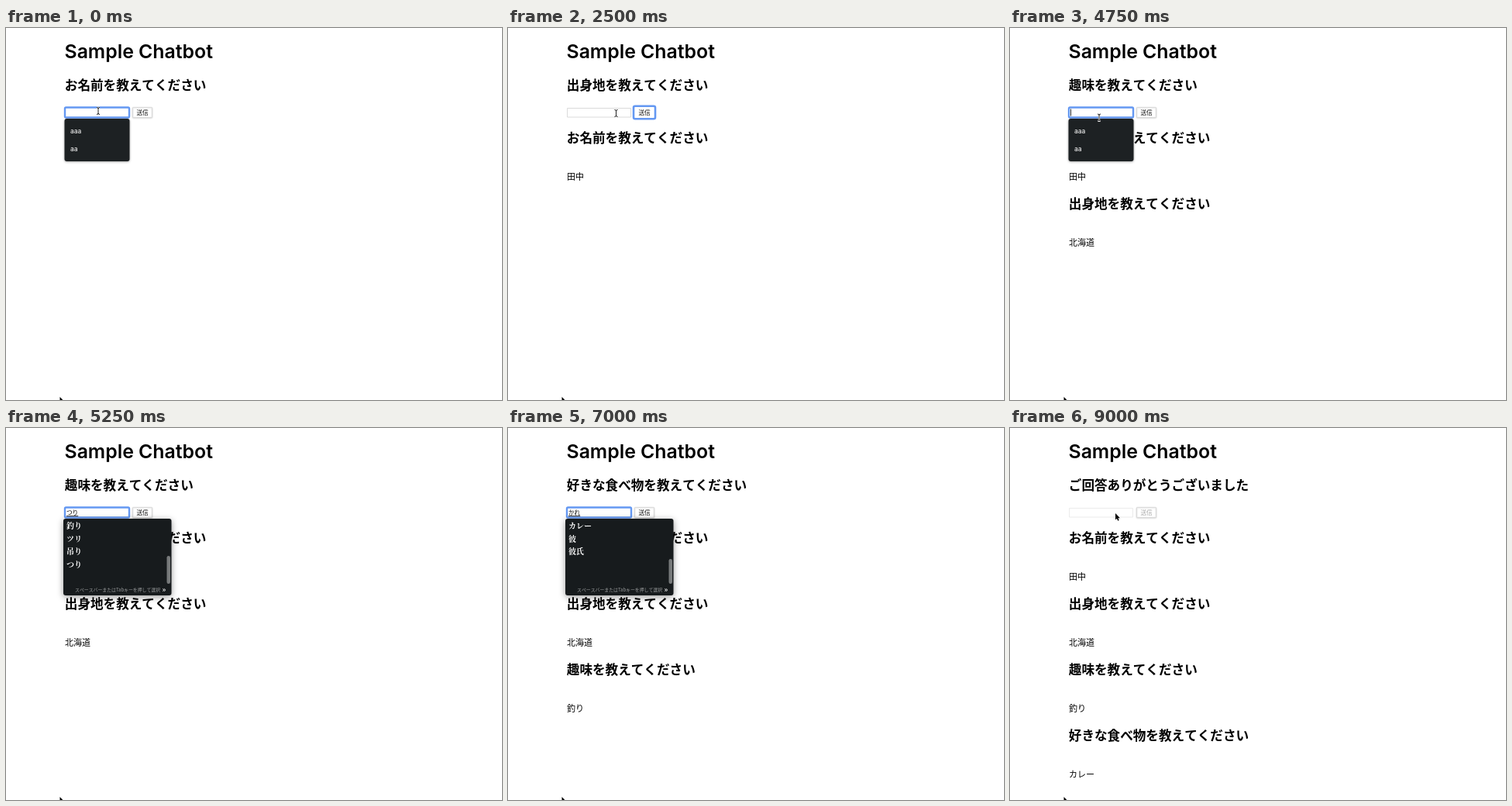
Animation, 640 px wide and 480 px high, one loop 9.25 s. Source, as an HTML page with a canvas:

```html
<!DOCTYPE html>
<html lang="ja">
<head>
<meta charset="utf-8">
<title>Sample Chatbot</title>
<style>
html, body { margin: 0; width: 100%; height: 100%; overflow: hidden; background: #fff; }
canvas { display: block; width: 640px; height: 480px; }
</style>
</head>
<body>
<canvas id="stage" width="640" height="480"></canvas>
<script>
const ctx = document.getElementById('stage').getContext('2d');
const LOOP = 9250, STEP = 250;
const SANS = '"Noto Sans CJK JP", "Noto Sans CJK", "Noto Sans", sans-serif';
const SERIF = '"Noto Serif CJK JP", "Noto Serif", "Noto Sans CJK JP", serif';
const LATIN = 'Inter, "Liberation Sans", sans-serif';
const BLUE = '#6498f2';

const ask = topic => topic + 'を教えてください';
const chat = [['お名前', '田中'], ['出身地', '北海道'], ['趣味', '釣り'], ['好きな食べ物', 'カレー']];

// Shorthands for the interface states
const beam = (x, y) => ({ kind: 'beam', x, y });
const arrow = (x, y) => ({ kind: 'arrow', x, y });
const typing = (text, list, bar = 165) => ({ text, mark: true, list, bar, focus: 'field' });
const typed = (text, mark) => ({ text, mark, focus: 'field', caret: true });
const history = (pointer, caret) => ({ focus: 'field', history: true, pointer, caret });
const sent = pointer => ({ focus: 'button', pointer });

const tanaka = ['田中', 'たなか', '棚か', '田仲'];
const hokkai = ['北海', 'ホッカ', '北韓', '北海道'];
const curry = ['カレー', '彼', '彼氏'];

// [step, answered questions, state]
const script = [
  [0, 0, history(beam(119, 107))],
  [1, 0, typed('t', true)],
  [2, 0, typing('た', ['田', 'た', '他', '多'])],
  [3, 0, typing('たn', ['田', 'た', '他', '多'])],
  [4, 0, typing('たな', ['棚', 'たな', '田名', '店'])],
  [5, 0, typing('たなか', tanaka)],
  [7, 0, typed('田中', true)],
  [8, 0, { ...typed('田中'), pointer: arrow(172, 107) }],
  [9, 1, sent(arrow(172, 107))],
  [10, 1, sent(beam(139.5, 110))],
  [11, 1, history(beam(119, 109), true)],
  [12, 1, typing('ほ', ['歩', 'ホ', '他', '保'])],
  [13, 1, { ...typing('ほっか', hokkai), caret: true }],
  [14, 1, typing('ほっかいどう', ['北海道', 'ホッカイドウ'])],
  [15, 1, typed('北海道', true)],
  [16, 1, typed('北海道')],
  [17, 1, { ...typed('北海道'), pointer: arrow(172, 107) }],
  [18, 2, sent(arrow(172, 107))],
  [19, 2, history(beam(115, 115.5), true)],
  [20, 2, typed('t', true)],
  [21, 2, typing('つり', ['釣り', 'ツリ', '吊り', 'つり'])],
  [22, 2, typed('釣り')],
  [23, 3, sent(arrow(172, 107))],
  [24, 3, sent(beam(143, 112))],
  [25, 3, history(beam(119, 110), true)],
  [26, 3, typed('k', true)],
  [27, 3, typing('か', ['か', '化', '課', '家'], 169)],
  [28, 3, typing('かれ', curry, 169)],
  [29, 3, typing('かれー', curry, 169)],
  [30, 3, typed('カレー', true)],
  [31, 3, typed('カレー')],
  [33, 3, { ...typed('カレー'), pointer: arrow(172, 107) }],
  [34, 4, { done: true, pointer: arrow(172, 107) }],
  [35, 4, { done: true, pointer: arrow(136, 110) }]
];

function text(str, x, y, font, color = '#000') {
  ctx.font = font;
  ctx.fillStyle = color;
  ctx.fillText(str, x, y);
}

function box(x, y, w, h, r, fill, stroke, line = 1) {
  ctx.beginPath();
  ctx.roundRect(x, y, w, h, r);
  if (fill) { ctx.fillStyle = fill; ctx.fill(); }
  if (stroke) { ctx.strokeStyle = stroke; ctx.lineWidth = line; ctx.stroke(); }
}

function panel(x, y, w, h, color, blur) {
  ctx.save();
  ctx.shadowColor = 'rgba(0,0,0,0.4)';
  ctx.shadowBlur = blur;
  ctx.shadowOffsetY = blur / 4;
  box(x, y, w, h, 3, color);
  ctx.restore();
}

const heading = (str, y) => text(str, 75.8, y, `bold 16.6px ${SANS}`);

function drawForm(s) {
  const inField = s.focus === 'field', inButton = s.focus === 'button';
  box(76.5, 103.5, 82, 11.5, 0, '#fff', s.done ? '#ebebeb' : '#dadada');
  if (inField) box(76, 102.5, 83, 13, 1.5, '#fff', BLUE, 2.4);

  ctx.save();
  ctx.shadowColor = 'rgba(0,0,0,0.2)';
  ctx.shadowBlur = 2;
  ctx.shadowOffsetY = 0.5;
  box(163.5, 102.5, 25, 13, 0.5, '#fff', '#d8d8d8', 0.8);
  ctx.restore();
  if (inButton) box(162, 100.8, 28, 16.4, 2, '#fff', BLUE, 2.6);
  text('送信', 168.4, 111.7, `7.6px ${SANS}`, s.done ? '#aaa' : '#111');

  const str = s.text || '';
  text(str, 78, 112, `7.6px ${SANS}`);
  const w = ctx.measureText(str).width;
  if (s.mark) ctx.fillRect(78, 113.3, w, 0.8);
  if (s.caret) ctx.fillRect(78 + w, 104.5, 0.8, 9);
}

function drawHistory() {
  panel(75.5, 117, 84, 55, '#1d2123', 3);
  text('aaa', 83, 136, `500 8.3px ${LATIN}`, '#eee');
  text('aa', 83, 158.8, `500 8.3px ${LATIN}`, '#eee');
}

function drawCandidates(s) {
  panel(74, 117, 139.5, 99, '#171b1d', 8);
  s.list.forEach((word, i) => text(word, 78, 129.6 + i * 16.9, `bold 10px ${SERIF}`, '#fff'));
  box(207.5, s.bar, 4.5, 201 - s.bar, 2.2, '#777a7b');
  text('スペースバーまたはTabキーを押して選択', 89, 211.2, `5.9px ${SANS}`, '#9a9c9d');
  text('»', 201.5, 212, `bold 9px ${SANS}`, '#eee');
}

function drawBeam({ x, y }) {
  for (const [color, width] of [['#fff', 2.2], ['#222', 1]]) {
    ctx.strokeStyle = color;
    ctx.lineWidth = width;
    ctx.beginPath();
    for (const d of [-1, 1]) {
      ctx.moveTo(x - 2, y + d * 4.5);
      ctx.quadraticCurveTo(x, y + d * 4.5, x, y + d * 3);
      ctx.quadraticCurveTo(x, y + d * 4.5, x + 2, y + d * 4.5);
    }
    ctx.moveTo(x, y - 4);
    ctx.lineTo(x, y + 4);
    ctx.stroke();
  }
}

function drawArrow({ x, y }) {
  const pts = [[0, 0], [0, 8.5], [1.9, 6.8], [3.2, 9.8], [4.7, 9.1], [3.4, 6.3], [6, 6.2]];
  ctx.beginPath();
  for (const [dx, dy] of pts) ctx.lineTo(x + dx, y + dy);
  ctx.closePath();
  ctx.strokeStyle = '#fff';
  ctx.lineWidth = 1.4;
  ctx.stroke();
  ctx.fillStyle = '#000';
  ctx.fill();
}

function draw(time) {
  const step = Math.floor(time / STEP);
  const [, count, s] = script.findLast(entry => entry[0] <= step);

  ctx.fillStyle = '#fff';
  ctx.fillRect(0, 0, 640, 480);
  text('Sample Chatbot', 75.5, 39.3, `600 24.8px ${LATIN}`);
  heading(s.done ? 'ご回答ありがとうございました' : ask(chat[count][0]), 79.7);
  chat.slice(0, count).forEach(([topic, answer], i) => {
    const y = i * 84.8;
    heading(ask(topic), 148.2 + y);
    text(answer, 76, 196.4 + y, `11px ${SANS}`);
  });
  drawForm(s);
  if (s.history) drawHistory();
  if (s.list) drawCandidates(s);
  if (s.pointer) (s.pointer.kind === 'beam' ? drawBeam : drawArrow)(s.pointer);
  drawArrow({ x: 69.5, y: 476 });
}

const start = performance.now();
function tick() {
  draw((performance.now() - start) % LOOP);
  requestAnimationFrame(tick);
}
tick();
</script>
</body>
</html>
```
